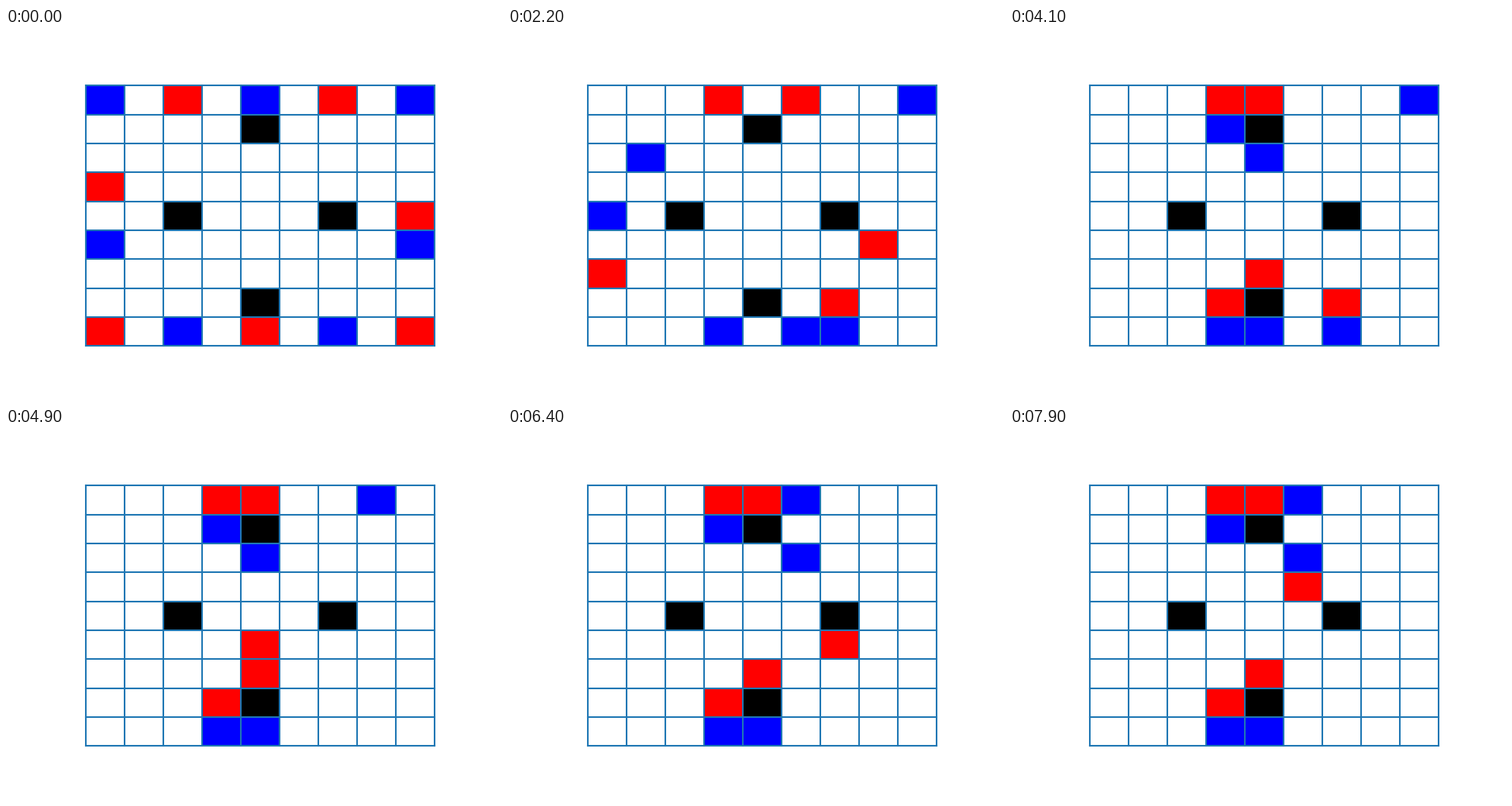
Animation of 640 by 480 pixels, one loop 8000 ms. Source, as a matplotlib script:

```python
import matplotlib.pyplot as plt
from matplotlib.animation import FuncAnimation
from matplotlib.patches import Rectangle

N = 9
FRAMES = 80
STEPS = {"U": (0, -1), "D": (0, 1), "L": (-1, 0), "R": (1, 0)}
WALLS = [(4, 1), (2, 4), (6, 4), (4, 7)]
START = {
    "blue": [(0, 0), (4, 0), (8, 0), (0, 5), (8, 5), (2, 8), (6, 8)],
    "red": [(2, 0), (6, 0), (0, 3), (8, 4), (0, 8), (4, 8), (8, 8)],
}

# Each side's moves in order: index of the piece, then its steps.
PLANS = {
    "blue": [(4, "DL"), (3, "U"), (5, "R"), (6, "L"), (4, "LDD"),
             (0, "DDR"), (3, "URRRRU"), (0, "RRU"), (6, "L"), (4, "LUU"),
             (2, "LL"), (3, "R"), (2, "L"), (3, "LR" * 6)],
    "red": [(1, "L"), (6, "L"), (3, "UDD"), (6, "U"), (4, "U"), (6, "L"),
            (4, "U"), (0, "R"), (3, "LLDL"), (4, "R"), (1, "L"),
            (4, "DRR"), (3, "L"), (6, "UULL"), (6, "RR" + "LR" * 3),
            (3, "U"), (6, "DLL"), (3, "URU")],
}


def neighbours(cell):
    return {(cell[0] + dx, cell[1] + dy) for dx, dy in STEPS.values()}


def capture(board):
    """Remove every piece touched by two enemies."""
    cells = {side: set(board[side].values()) for side in board}
    for side, enemy in (("blue", "red"), ("red", "blue")):
        board[side] = {i: c for i, c in board[side].items()
                       if len(neighbours(c) & cells[enemy]) < 2}


def play():
    """Return the occupied cells of both sides after every turn."""
    queues = {side: iter([(i, s) for i, path in plan for s in path])
              for side, plan in PLANS.items()}
    board = {side: dict(enumerate(cells)) for side, cells in START.items()}
    history = []
    for turn in range(FRAMES):
        if turn:
            side = "blue" if turn % 2 else "red"
            piece, step = next(queues[side])
            x, y = board[side][piece]
            dx, dy = STEPS[step]
            board[side][piece] = (x + dx, y + dy)
            capture(board)
        history.append({s: list(p.values()) for s, p in board.items()})
    return history


def add_cell(cell, color):
    return ax.add_patch(Rectangle(cell, 1, 1, facecolor=color,
                                  edgecolor="none", zorder=1))


fig, ax = plt.subplots(figsize=(6.4, 4.8), dpi=100)
ax.set_axis_off()
ax.set_xlim(-0.05 * N, 1.05 * N)
ax.set_ylim(1.05 * N, -0.05 * N)

for k in range(N + 1):
    ax.plot([0, N], [k, k], color="C0", lw=1.5, zorder=2)
    ax.plot([k, k], [0, N], color="C0", lw=1.5, zorder=2)
for wall in WALLS:
    add_cell(wall, "black")

pieces = {side: [add_cell(c, side) for c in cells]
          for side, cells in START.items()}
history = play()


def update(frame):
    for side, patches in pieces.items():
        cells = history[frame][side]
        for i, patch in enumerate(patches):
            patch.set_visible(i < len(cells))
            if i < len(cells):
                patch.set_xy(cells[i])
    return [p for patches in pieces.values() for p in patches]


anim = FuncAnimation(fig, update, frames=FRAMES, interval=100, repeat=True,
                     repeat_delay=0)
plt.show()
```
